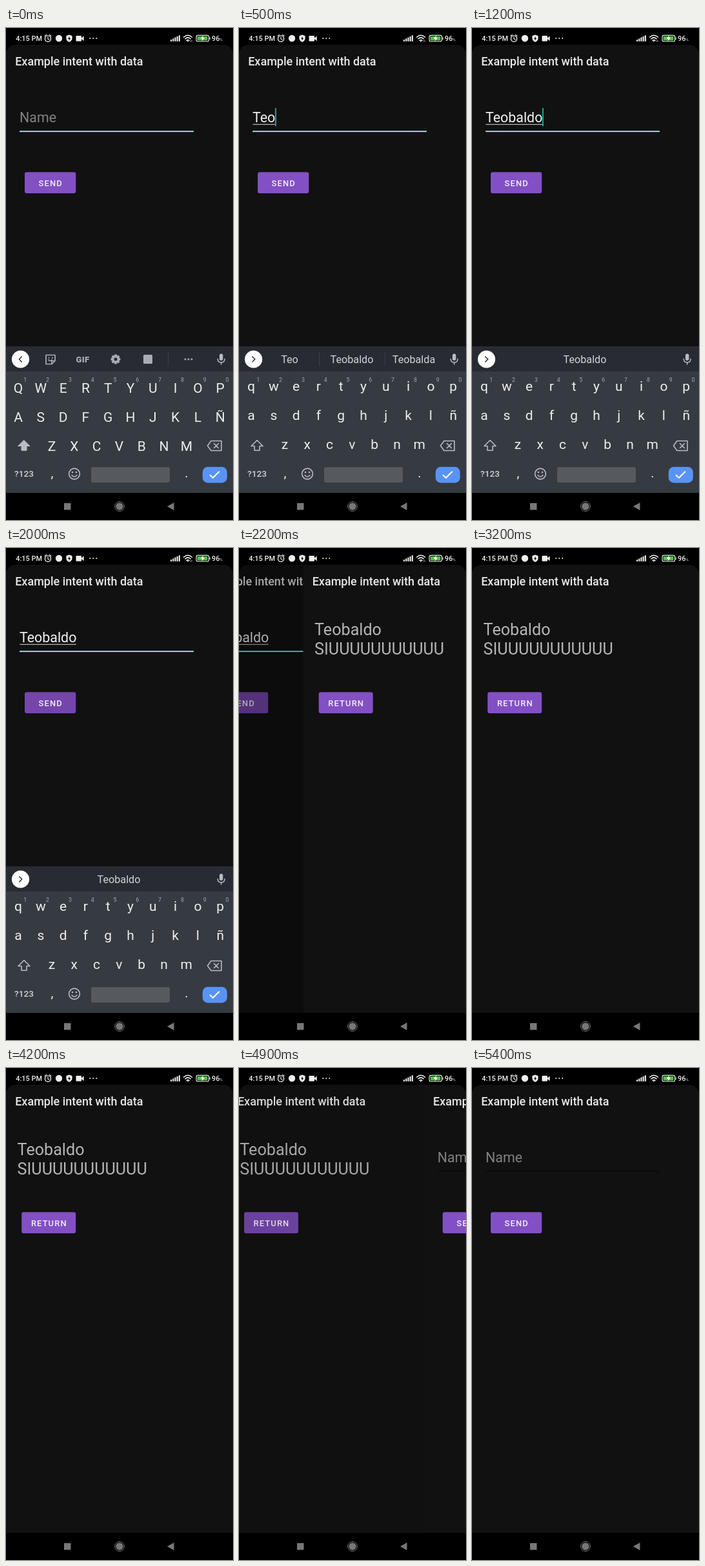
These frames come from a looping animation (352x762 px, 5700 ms). An HTML page:

```html
<!DOCTYPE html>
<html lang="en">
<head>
<meta charset="utf-8">
<title>Intent demo</title>
<style>
html, body { margin: 0; width: 100%; height: 100%; overflow: hidden; background: #000; }
svg { display: block; width: 100vw; height: 100vh; font-family: Roboto, sans-serif; }
</style>
</head>
<body>
<svg id="stage" viewBox="0 0 352 762"></svg>
<script>
const LOOP = 5700, STEP = 100;
const NAME = 'Teobaldo', ALT = 'Teobalda';
const PURPLE = [131, 80, 196], PRESSED = [116, 70, 172];
const stage = document.getElementById('stage');
const pen = document.createElement('canvas').getContext('2d');
const clamp = v => Math.max(0, Math.min(1, v));

const text = (x, y, size, fill, str, extra = '') =>
  `<text x="${x}" y="${y}" font-size="${size}" fill="${fill}" ${extra}>${str}</text>`;
const mid = (x, y, size, fill, str, extra = '') =>
  text(x, y, size, fill, str, 'text-anchor="middle" ' + extra);
const rect = (x, y, w, h, fill, r = 0, extra = '') =>
  `<rect x="${x}" y="${y}" width="${w}" height="${h}" fill="${fill}" rx="${r}" ${extra}/>`;
const dot = (x, y, r, fill, extra = '') =>
  `<circle cx="${x}" cy="${y}" r="${r}" fill="${fill}" ${extra}/>`;
const shape = (d, fill) => `<path d="${d}" fill="${fill}"/>`;
const line = (d, stroke, w = 1.5) =>
  `<path d="${d}" fill="none" stroke="${stroke}" stroke-width="${w}" stroke-linecap="round" stroke-linejoin="round"/>`;
const group = (x, y, body) => `<g transform="translate(${x} ${y})">${body}</g>`;

function textWidth(str, size) {
  pen.font = size + 'px Roboto, sans-serif';
  return pen.measureText(str).width;
}

// Remaining distance of the critically damped page slide.
function slide(t, start) {
  if (t < start) return 352;
  const k = (t - start) / 1000 * 17.4;
  const x = 352 * (1 + k) * Math.exp(-k);
  return x < 0.3 ? 0 : x;
}

function statusBar(t) {
  const w = '#f0f0f0';
  let s = text(15.3, 20.2, 10.9, w, '4:15 PM', 'font-weight="500"');
  s += dot(65, 16.5, 4.6, 'none', `stroke="${w}" stroke-width="1.4"`) +
    line('M65 14v3l2 1M60 12.5l2.5-2M70 12.5l-2.5-2', w, 1.2);
  s += dot(82, 16, 5.2, w);
  s += shape('M98 10.5l4.6 1.8v3.5q0 4-4.6 6-4.6-2-4.6-6v-3.5z', w) +
    shape('M98.8 12.8l-3 4h2l-.5 3 3-4h-2z', '#000');
  s += rect(108.5, 12, 8.5, 8.5, w, 1) + shape('M117 15.5l3.6-3v7.5l-3.6-3z', w);
  for (let i = 0; i < 3; i++) s += dot(130.3 + i * 5, 16, 1.05, w);
  for (let i = 0; i < 5; i++) s += rect(255 + i * 3.2, 18 - i * 1.7, 2.1, 2.8 + i * 1.7, w, 0.6);
  s += line('M275.5 14.2q6.5-6 13 0M277.8 16.8q4.2-3.8 8.4 0M280 19.2q2-1.6 4 0', w, 1.5) + dot(282, 20.6, 1, w);
  if (t < 3200) s += line('M286.3 19v2.2M288.2 19v2.2', '#bbb', 0.8);
  s += rect(295, 11.4, 19.6, 9.4, 'none', 2.6, `stroke="${w}" stroke-width="1.1"`) +
    rect(296.6, 13, 16, 6.2, '#45c93f', 1) + rect(315.4, 14.3, 1.2, 3.6, w, 0.5) +
    shape('M306 11.5l-4.5 5h3l-1 4 4.7-5.2h-3z', '#fff');
  return s + text(319, 20.2, 10.9, w, '96', 'font-weight="500"') + text(331.3, 20.2, 6.2, w, '%');
}

function navBar() {
  const c = '#777';
  return rect(0, 720, 352, 42, '#000') + rect(90, 735.8, 10.5, 10.5, c) +
    dot(176, 741, 7.4, 'none', `stroke="${c}" stroke-width="1"`) + dot(176, 741, 5.7, c) +
    shape('M250 741l10.5-6v12z', c);
}

function button(x, w, label, press) {
  const rgb = PURPLE.map((v, i) => Math.round(v + (PRESSED[i] - v) * press));
  return rect(x, 223.2, w, 32.8, `rgb(${rgb})`, 3) +
    mid(x + w / 2 + 0.6, 244.5, 12.9, '#f4eefa', label, 'font-weight="500" letter-spacing="1.15"');
}

const page = body => rect(0, 26, 352, 694, '#111112') +
  text(14.2, 58.3, 18, '#e8e8e8', 'Example intent with data', 'font-weight="500"') + body;

function formPage(typed, cursor, focus, press) {
  const w = textWidth(typed, 21.4);
  let s = focus ? rect(21, 159.2, 270, 1.9, '#93e3ea') : rect(21, 159.5, 270, 1, '#070707');
  if (typed) s += text(21, 146, 21.4, '#f2f2f2', typed) + rect(21.5, 148.8, w - 1, 1, '#ddd');
  else s += text(21, 146, 21.4, '#828282', 'Name');
  if (cursor) s += rect(20.6 + w, 124, 1.9, 28, '#26a893');
  return page(s + button(29, 79.3, 'SEND', press));
}

const resultPage = press => page(
  text(17.6, 135.2, 25.15, '#b5b5b5', NAME) +
  text(17.6, 164.5, 25.15, '#b5b5b5', 'SI' + 'U'.repeat(11)) +
  button(24.2, 84, 'RETURN', press));

const ROWS = [['qwertyuiop', 19, 557], ['asdfghjklñ', 19, 602], ['zxcvbnm', 71, 647]];

function popup(key) {
  for (const [keys, x0, y] of ROWS) {
    const i = keys.indexOf(key.toLowerCase());
    if (i < 0) continue;
    const x = x0 + i * 34.8;
    return rect(x - 16, y - 62, 32, 78, '#4d5259', 5) + mid(x, y - 31, 25, '#fff', key);
  }
  return '';
}

function tools() {
  const c = '#a9adb3';
  let s = line('M62 506.5h14v9l-5 5h-9zM71 520.5v-5h5M66 514q2.5 3 5 0', c, 1.7) +
    dot(66.5, 510.8, 1, c) + dot(72, 510.8, 1, c);
  s += mid(119, 517.6, 13, c, 'GIF', 'font-weight="900" letter-spacing=".4"');
  for (let i = 0; i < 4; i++) s += rect(168, 505.6, 4, 14.8, c, 1, `transform="rotate(${i * 45} 170 513)"`);
  s += dot(170, 513, 5.7, c) + dot(170, 513, 2.5, '#282b32');
  s += rect(213, 506, 14, 14, c, 1.5);
  s += rect(251, 502, 1, 22, '#3c4047');
  for (let i = 0; i < 3; i++) s += dot(278 + i * 5, 513, 1.5, c);
  return s;
}

function suggestions(typed, done) {
  const c = '#d0d3d8', put = (x, str) => mid(x, 519, 16.2, c, str);
  if (done) return put(175, NAME);
  return put(78.5, typed) + put(175, NAME) + put(271, ALT) +
    rect(124, 502, 1, 22, '#3c4047') + rect(226, 502, 1, 22, '#3c4047');
}

function keyboard(typed, upper, done, key) {
  const c = '#eceef0', soft = '#b9bcc2';
  let s = rect(0, 493, 352, 40, '#282b32') + rect(0, 532, 352, 188, '#363a41');
  s += dot(22.5, 513, 13.6, '#fff') +
    line(typed ? 'M20.7 509l4 4-4 4' : 'M24.3 509l-4 4 4 4', '#333', 1.6);
  s += typed ? suggestions(typed, done) : tools();
  s += rect(331, 504.5, 5.4, 10.5, soft, 2.7) + line('M328.3 512.5q0 5.5 5.4 5.5t5.4-5.5M333.7 518v3', soft, 1.5);
  ROWS.forEach(([keys, x0, y], row) => [...keys].forEach((k, i) => {
    const x = x0 + i * 34.8;
    s += mid(x, y + (upper ? 7.6 : 5.2), 21, c, upper ? k.toUpperCase() : k);
    if (!row) s += mid(x + 10.8, 547.8, 8.8, '#a4a7ad', (i + 1) % 10);
  }));
  const arrow = 'M28 638.5l9 9h-5v6.8h-8v-6.8h-5z';
  s += upper ? shape(arrow, soft) + line(arrow, soft, 1) : line(arrow, soft, 1.6);
  s += line('M312.5 647l5.5-7.5h16v15h-16zM322.5 643.5l7 7M329.5 643.5l-7 7', soft, 1.6);
  s += mid(28, 695.4, 13.6, '#d0d3d8', '?123', 'font-weight="500"');
  s += mid(71.5, 696, 20, c, ',') + mid(280, 696, 20, c, '.');
  s += dot(106, 690.5, 8.4, 'none', `stroke="${soft}" stroke-width="1.6"`) +
    dot(103, 688, 1.3, soft) + dot(109, 688, 1.3, soft) + line('M102 692.5q4 5 8 0', soft, 1.5);
  s += rect(132, 680, 122, 24, '#565a5f', 3);
  s += rect(304.8, 679.8, 38, 24.6, '#5894f6', 8) + line('M316.5 692.5l4.3 4.3 9.5-9.5', '#fff', 2);
  return s + (key ? popup(key) : '');
}

// Time at which each letter lands in the field.
const LANDS = [200, 300, 400, 700, 800, 900, 1000, 1200];

function draw(t) {
  const typed = NAME.slice(0, LANDS.filter(at => at <= t).length);
  const next = LANDS.findIndex(at => at === t + STEP);
  const press = start => clamp((t - start) / 250);
  const first = t < 4600;
  const under = first ? formPage(typed, t >= 200 && t < 1700, true, press(1750)) : resultPage(press(4600));
  const x = slide(t, first ? 2055 : 4855);
  const shown = 1 - x / 352;
  let pages = '';
  if (x > 0) pages += group(-88 * shown, 0, under) + rect(0, 26, 352, 694, '#000', 0, `opacity="${0.4 * shown}"`);
  if (x < 352) pages += group(x, 0, first ? resultPage(0) : formPage('', false, false, 0));
  let s = rect(0, 0, 352, 762, '#000') +
    '<clipPath id="screen"><rect y="26" width="352" height="720" rx="15"/></clipPath>' +
    `<g clip-path="url(#screen)">${pages}</g>`;
  if (t < 2200) {
    const drop = 227 * clamp((t - 2000) / 200);
    s += group(0, drop, keyboard(typed, t < 200, t >= 1200, next < 0 ? '' : NAME[next]));
  }
  stage.innerHTML = s + navBar() + statusBar(t);
}

let last = -1;
const begin = performance.now();
function tick() {
  const t = Math.floor((performance.now() - begin) % LOOP / STEP) * STEP;
  if (t !== last) draw(last = t);
  requestAnimationFrame(tick);
}
tick();
</script>
</body>
</html>
```
